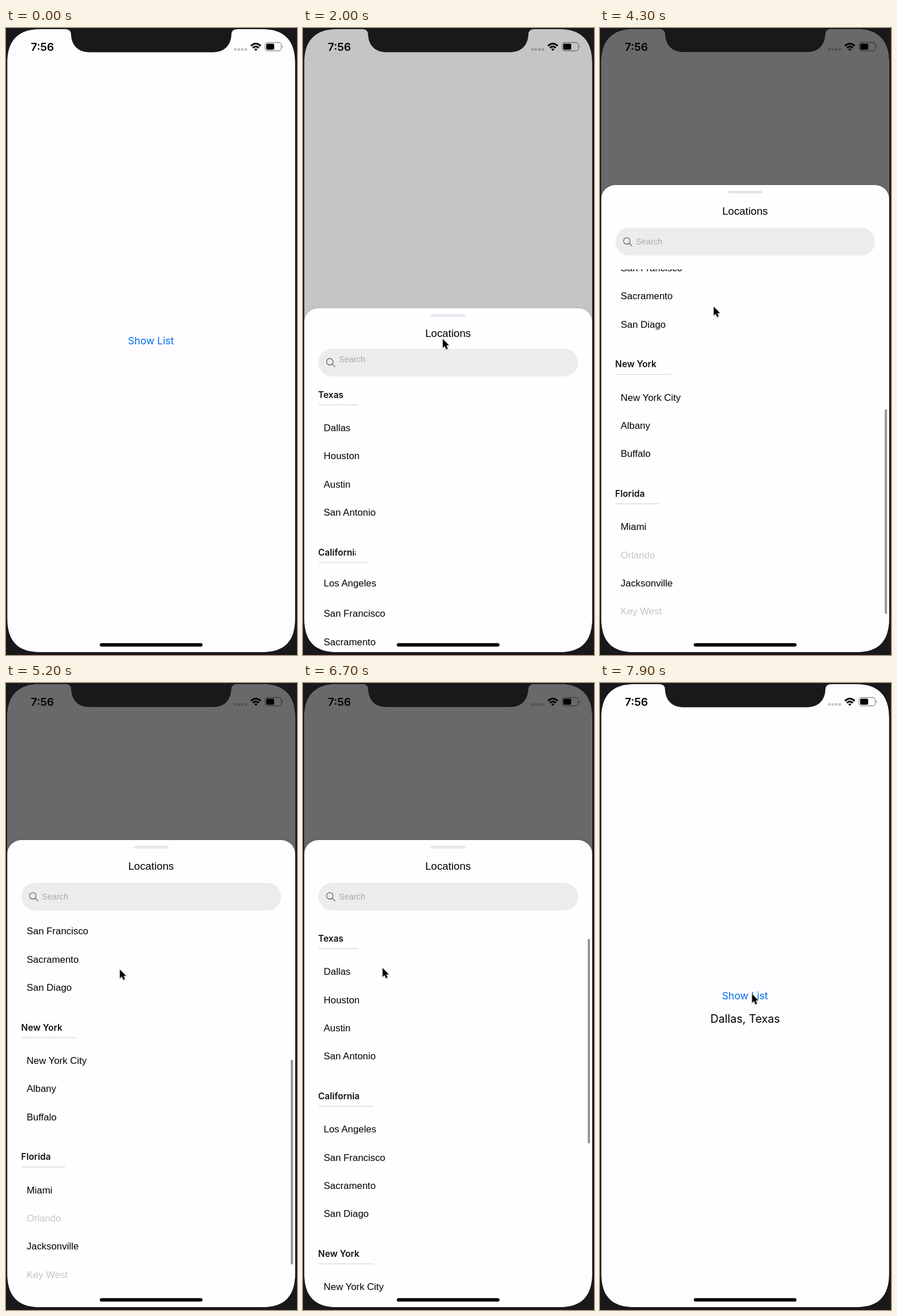
An HTML page for the animation above (8 s loop, 510 px wide and 1098 px high).

```html
<!DOCTYPE html>
<html lang="en">
<head>
<meta charset="utf-8">
<title>Locations sheet</title>
<style>
  html, body { margin: 0; width: 100%; height: 100%; overflow: hidden; background: #19181b; }
  svg { display: block; width: 510px; height: 1098px; }
  text { font: 16.9px "Liberation Sans", Arial, sans-serif; fill: #000; }
  .ui { font-family: Inter, sans-serif; }
  .time { font-size: 19.2px; font-weight: 600; }
  .button { font-size: 17.6px; fill: #0070e8; }
  .result { font-size: 19.7px; }
  .title { font-size: 18.7px; }
  .hint { font-size: 14.6px; fill: #a9a7ab; }
  .head { font-size: 15.6px; font-weight: 600; fill: #111; }
  .off { fill: #c6c4c9; }
  .mid { text-anchor: middle; }
  .shadow { filter: drop-shadow(0 0 2px rgba(0,0,0,.12)); }
  .arrow { filter: drop-shadow(0 1px 1px rgba(0,0,0,.3)); }
</style>
</head>
<body>
<svg viewBox="0 0 510 1098">
  <defs>
    <clipPath id="screen">
      <path d="M60 2H104Q114 2 114 12C115 31 127 42.4 146 42.4H363C382 42.4 394 31 395 12Q395 2 405 2H449C488 2 506.7 22 506.7 61V1034C506.7 1074 488 1093 449 1093H60C21 1093 2.3 1074 2.3 1034V61C2.3 22 21 2 60 2Z"/>
    </clipPath>
    <clipPath id="titleClip"><rect id="titleBox" x="190" width="130"/></clipPath>
    <clipPath id="listClip"><rect id="listBox" width="510" height="960"/></clipPath>
    <clipPath id="wideClip"><rect id="wideBox" x="20" y="-3000" height="6000"/></clipPath>
  </defs>
  <rect width="510" height="1098" fill="#19181b"/>
  <g clip-path="url(#screen)">
    <rect width="510" height="1098" fill="#fffcff"/>
    <text id="button" class="ui button mid" x="254" y="548" dy=".3635em">Show List</text>
    <text id="result" class="ui result mid" x="254.5" y="588" dy=".3635em">Dallas, Texas</text>
    <g id="dots" fill="#c6c4c8"></g>
    <rect id="dim" width="510" height="1098" fill="#020003"/>
    <text class="ui time" x="43.5" y="33" dy=".3635em">7:56</text>
    <g fill="none" stroke="#000" stroke-width="3">
      <path d="M429.3 31.3Q437.8 23.2 446.3 31.3M432.6 34.8Q437.8 30 443 34.8"/>
      <path d="M435 37.2Q437.8 34.9 440.6 37.2L437.8 40Z" fill="#000" stroke="none"/>
    </g>
    <rect x="454" y="25.5" width="28.5" height="14.5" rx="4" fill="none" stroke="#000" stroke-opacity=".42" stroke-width="1.3"/>
    <rect x="456" y="27.5" width="14" height="10.5" rx="2" fill="#000"/>
    <path d="M484 30.5Q486.5 32.7 484 35Z" fill-opacity=".5"/>
    <g id="sheet">
      <rect class="shadow" x="2" width="505" height="1200" rx="25" fill="#fffdff"/>
      <rect x="224" y="10" width="61" height="5" rx="2.5" fill="#e8e6ea"/>
      <g clip-path="url(#titleClip)">
        <text id="title" class="title mid" x="254.2" dy=".346em">Locations</text>
      </g>
      <g id="search">
        <rect x="27" y="75" width="455" height="48.5" rx="24.2" fill="#ecebed"/>
        <g fill="none" stroke="#666468" stroke-width="1.3" stroke-linecap="round">
          <circle cx="47" cy="97.8" r="5.7"/><path d="M51.2 102L56 106.7"/>
        </g>
        <text id="hint" class="hint" x="63" dy=".346em">Search</text>
      </g>
      <g clip-path="url(#listClip)"><g id="list"></g></g>
      <rect id="bar" x="499" width="4" rx="2" fill="#98969a"/>
    </g>
    <rect x="164.4" y="1077.2" width="180" height="6.1" rx="3" fill="#000"/>
  </g>
  <g id="cursor" class="arrow">
    <path d="M.5 1V16.4L4 13.2L6.4 19L9.2 17.8L6.8 12.2H11.4Z" stroke="#fff" stroke-width="1" paint-order="stroke"/>
  </g>
</svg>
<script>
const LOOP = 8000, STEP = 100;
const $ = id => document.getElementById(id);
const set = (node, attrs) => { for (const k in attrs) node.setAttribute(k, attrs[k]); return node; };
const move = (id, x, y) => set($(id), { transform: `translate(${x} ${y})` });
const show = (id, on) => set($(id), { visibility: on ? 'visible' : 'hidden' });
const clamp = (v, lo, hi) => Math.min(Math.max(v, lo), hi);

// Ease in and out from 0 to 1.
const ramp = (t, from, span) => (1 - Math.cos(Math.PI * clamp((t - from) / span, 0, 1))) / 2;

function add(parent, tag, attrs, text = '') {
  const node = document.createElementNS('http://www.w3.org/2000/svg', tag);
  node.textContent = text;
  return parent.appendChild(set(node, attrs));
}

const sections = {
  'Texas': ['Dallas', 'Houston', 'Austin', 'San Antonio'],
  'California': ['Los Angeles', 'San Francisco', 'Sacramento', 'San Diago'],
  'New York': ['New York City', 'Albany', 'Buffalo'],
  'Florida': ['Miami', 'Orlando', 'Jacksonville', 'Key West']
};
const disabled = ['Orlando', 'Key West'];
const ROW = 49.35, LINE_PAD = 25;
const list = $('list');
let wideLine, wideWidth, firstCity;

let y = 172.3;
for (const [name, cities] of Object.entries(sections)) {
  const wide = name === 'California';
  const box = add(list, 'g', wide ? { 'clip-path': 'url(#wideClip)' } : {});
  const head = add(box, 'text', { class: 'ui head', x: 26.6, y, dy: '.3635em' }, name);
  const width = head.getComputedTextLength() + LINE_PAD;
  const line = add(list, 'rect', { x: 27, y: y + 17.4, width, height: 1.1, fill: '#d3d1d6' });
  cities.forEach((city, i) => {
    const cls = disabled.includes(city) ? 'off' : '';
    const label = add(list, 'text', { class: cls, x: 36.3, y: y + 58.2 + i * ROW, dy: '.346em' }, city);
    if (wide && !i) firstCity = label;
  });
  if (wide) [wideLine, wideWidth] = [line, width];
  y += 127.9 + (cities.length - 1) * ROW;
}
for (let i = 0; i < 4; i++) add($('dots'), 'rect', { x: 399.8 + i * 6.1, y: 35.2, width: 4.6, height: 4.6, rx: 1.3 });

// Pointer moves: start, end, x, y
const moves = [
  [0, 900, 236, 546], [1000, 1800, 244.5, 543.5], [2800, 2900, 237, 545],
  [2900, 3600, 176, 860], [3700, 4440, 201, 452], [5000, 5900, 185, 868],
  [5900, 6300, 148, 453], [6400, 6700, 139, 498],
  [7400, 7800, 291, 552], [7800, 7900, 266, 543.5]
];
function pointer(t) {
  let px = 346, py = 697;
  for (const [from, to, x, y] of moves) {
    const k = ramp(t, from, to - from);
    px += (x - px) * k;
    py += (y - py) * k;
  }
  return [px, py];
}

const SCROLL_MAX = 411.5, PULL = 37.5, BOUNCE = 2.5;
function scrollAt(t) {
  const end = SCROLL_MAX + PULL;
  return end * ramp(t, 3700, 740) - (end + BOUNCE) * ramp(t, 5000, 900) + BOUNCE * ramp(t, 5900, 400);
}

function draw(t) {
  const closing = t > 6800;
  const close = ramp(t, 6800, 300);
  const slide = ramp(t, 1800, 304) - close;
  const squash = 1 - ramp(t, 2000, 400);
  const titleShift = closing ? -8.5 : -1.5 * squash;
  const searchShift = closing ? -16 : -4 * squash;
  const listShift = closing ? -16 : -21 * squash;

  set($('button'), { opacity: t >= 1700 && t < 1900 ? .3 : 1 });
  show('result', closing);
  set($('dim'), { opacity: .585 * (ramp(t, 1800, 470) - close) });

  move('sheet', 0, 1098 - 823 * slide);
  const titleY = 45.5 + titleShift, half = 11.5 + titleShift;
  set($('title'), { y: titleY });
  set($('titleBox'), { y: titleY - half, height: 2 * half });
  move('search', 0, searchShift);
  set($('hint'), { y: 99.3 - 6 * squash });

  const scroll = scrollAt(t), kept = clamp(scroll, 0, SCROLL_MAX);
  move('list', 0, listShift - scroll);
  set($('listBox'), { y: 147.5 + listShift });
  set(firstCity, { dy: 5.85 - 4 * squash });
  set(wideLine, { width: wideWidth - 9 * squash });
  set($('wideBox'), { width: 90 - 17.5 * squash });

  set($('bar'), {
    y: 173 + listShift + 220 * kept / SCROLL_MAX + Math.max(0, scroll - kept),
    height: 358.5 - Math.abs(scroll - kept)
  });
  show('bar', t >= 3800);

  move('cursor', ...pointer(t));
  show('cursor', t >= 100);
}

const start = performance.now();
function tick() {
  const t = Math.max(0, performance.now() - start) % LOOP;
  draw(Math.floor(t / STEP) * STEP);
  requestAnimationFrame(tick);
}
tick();
</script>
</body>
</html>
```
